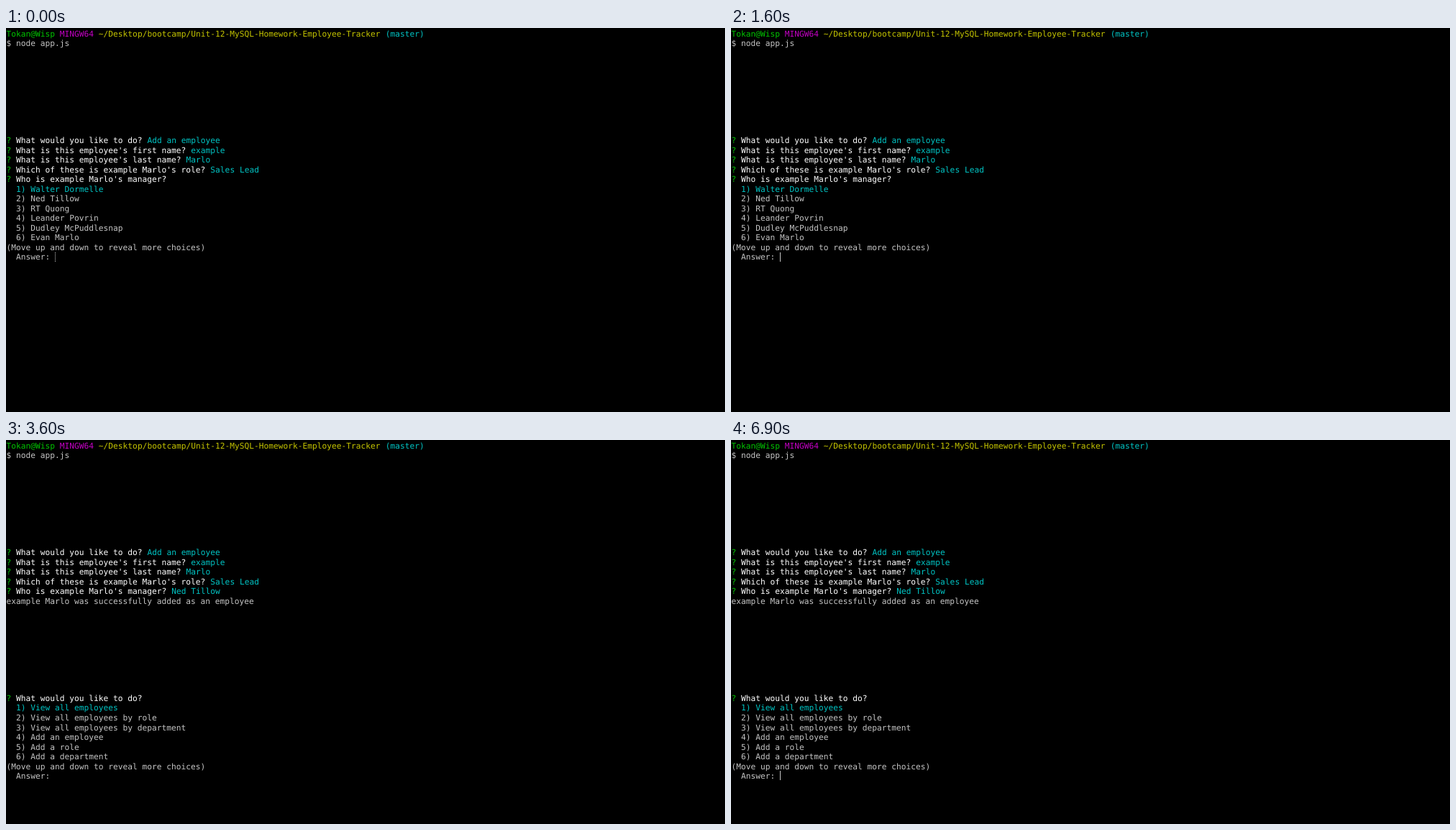
An HTML page that plays this animation: 1000x534 px, repeating every 7200 ms.

```html
<!DOCTYPE html>
<html lang="en">
<head>
<meta charset="utf-8">
<title>Employee tracker terminal</title>
<style>
  html, body { margin: 0; width: 100%; height: 100%; overflow: hidden; background: #000; }
  svg { display: block; width: 1000px; height: 534px; }
  text {
    font-family: "DejaVu Sans Mono", monospace;
    font-size: 11.23px;
    white-space: pre;
    text-rendering: geometricPrecision;
  }
</style>
</head>
<body>
<svg id="screen" viewBox="0 0 1000 534"></svg>
<script>
const LOOP = 7200;
const TYPED_AT = 1800;
const SUBMITTED_AT = 2500;
const BLINKS = [400, 1000, 1500, 2100, 2600, 3100, 3700, 4200, 4700, 5200, 5800, 6300, 6800];

const LEFT = 0.4;
const CELL_W = 6.761;
const CELL_H = 13.514;
const GRAY = "#c4c4c4", WHITE = "#fff", CYAN = "#00c4c4", GREEN = "#00c400",
      MAGENTA = "#c400c4", YELLOW = "#c4c400";

const MANAGERS = ["Walter Dormelle", "Ned Tillow", "RT Quong", "Leander Povrin",
                  "Dudley McPuddlesnap", "Evan Marlo"];
const ACTIONS = ["View all employees", "View all employees by role",
                 "View all employees by department", "Add an employee", "Add a role",
                 "Add a department"];

const screen = document.getElementById("screen");

function add(parent, tag, attrs) {
  const node = document.createElementNS("http://www.w3.org/2000/svg", tag);
  for (const name in attrs) node.setAttribute(name, attrs[name]);
  return parent.appendChild(node);
}

// Writes [color, string] spans on the character grid.
function write(parent, row, ...spans) {
  let col = 0;
  for (const [fill, string] of spans) {
    const attrs = { x: LEFT + col * CELL_W, y: 11.6 + row * CELL_H, fill };
    add(parent, "text", attrs).textContent = string;
    col += string.length;
  }
}

function ask(parent, row, question, answer = "") {
  write(parent, row, [GREEN, "?"], [WHITE, ` ${question} `], [CYAN, answer]);
}

function askManager(parent, answer) {
  ask(parent, 15, "Who is example Marlo's manager?", answer);
}

function menu(parent, row, choices, selected, input = "") {
  choices.forEach((choice, i) =>
    write(parent, row + i, [i === selected ? CYAN : GRAY, `  ${i + 1}) ${choice}`]));
  write(parent, row + 6, [GRAY, "(Move up and down to reveal more choices)"]);
  write(parent, row + 7, [GRAY, "  Answer: " + input]);
}

function view(draw) {
  const group = add(screen, "g", {});
  draw(group);
  return group;
}

add(screen, "rect", { width: 1000, height: 534, fill: "#000" });

write(screen, 0, [GREEN, "Tokan@Wisp "], [MAGENTA, "MINGW64 "],
  [YELLOW, "~/Desktop/bootcamp/Unit-12-MySQL-Homework-Employee-Tracker "], [CYAN, "(master)"]);
write(screen, 1, [GRAY, "$ node app.js"]);
ask(screen, 11, "What would you like to do?", "Add an employee");
ask(screen, 12, "What is this employee's first name?", "example");
ask(screen, 13, "What is this employee's last name?", "Marlo");
ask(screen, 14, "Which of these is example Marlo's role?", "Sales Lead");

const choosing = view(g => {
  askManager(g);
  menu(g, 16, MANAGERS, 0);
});
const typed = view(g => {
  askManager(g);
  menu(g, 16, MANAGERS, 1, "2");
});
const submitted = view(g => {
  askManager(g, MANAGERS[1]);
  write(g, 16, [GRAY, "example Marlo was successfully added as an employee"]);
  ask(g, 26, "What would you like to do?");
  menu(g, 27, ACTIONS, 0);
});
const cursor = add(screen, "line", { x1: 68.5, x2: 68.5, stroke: GRAY });

function show(node, visible) {
  node.style.display = visible ? "" : "none";
}

function render(t) {
  const done = t >= SUBMITTED_AT;
  show(choosing, t < TYPED_AT);
  show(typed, t >= TYPED_AT && !done);
  show(submitted, done);

  // The cursor is still fading out when the loop begins.
  const fading = t < 100;
  const lit = BLINKS.filter(time => time <= t).length % 2 === 1;
  const top = Math.round((done ? 34 : 23) * CELL_H + 1);
  show(cursor, lit || fading);
  cursor.setAttribute("y1", top);
  cursor.setAttribute("y2", top + 13);
  cursor.setAttribute("stroke-dasharray", fading ? "1 1" : "none");
}

const start = performance.now();
function tick() {
  render((performance.now() - start) % LOOP);
  requestAnimationFrame(tick);
}
tick();
</script>
</body>
</html>
```
